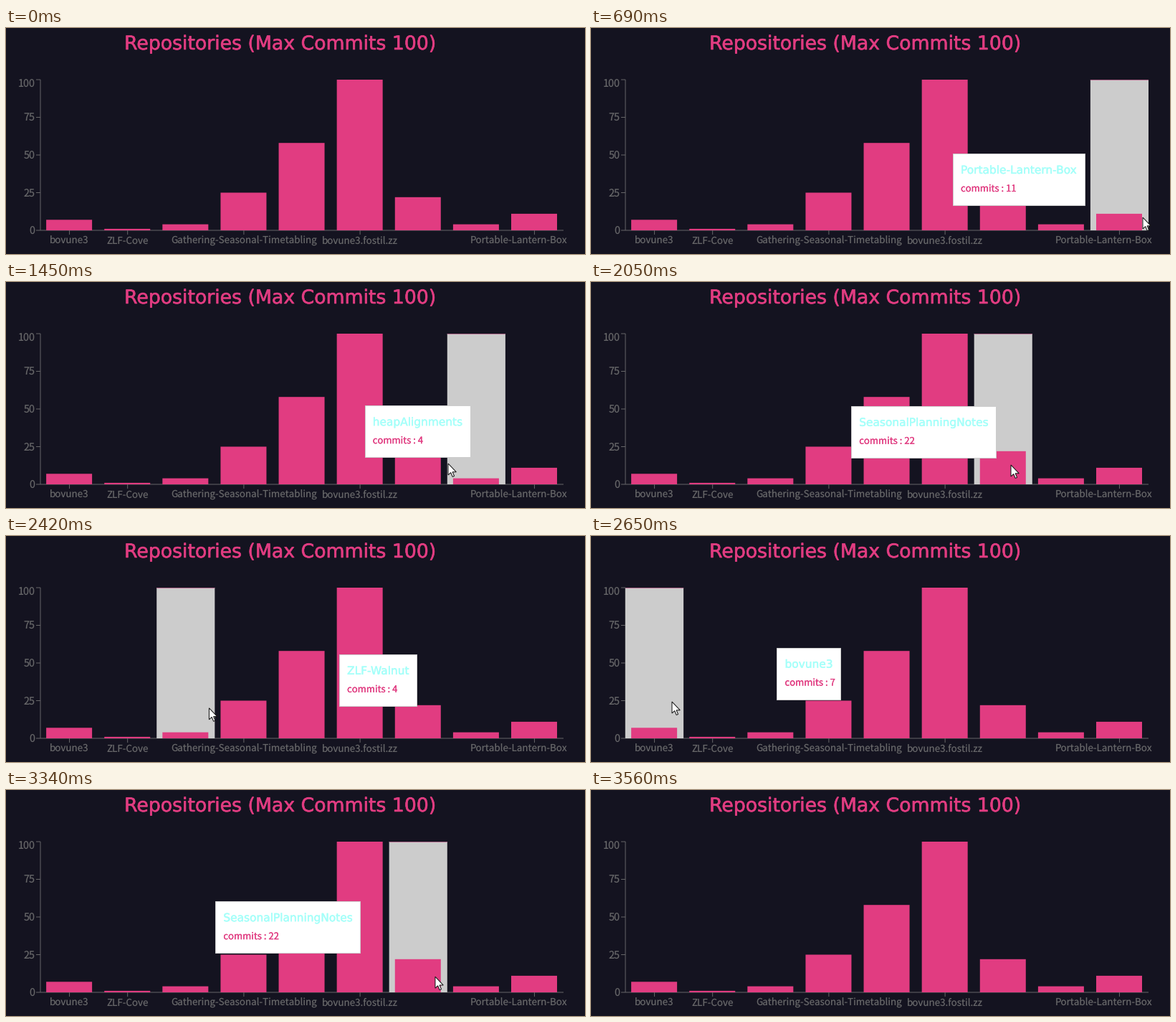
These frames come from a looping animation (808x315 px, 3.95 s). A matplotlib script:

```python
import matplotlib.pyplot as plt
import numpy as np
from matplotlib.animation import FuncAnimation
from matplotlib.patches import Polygon, Rectangle
from matplotlib.patheffects import withStroke

W, H, DPI = 808, 315, 100
LOOP, TICK = 3950, 10
PT = 72 / DPI
BG, PINK, GREY, BAND, AQUA = "#141320", "#e13c81", "#666668", "#cccccc", "#a5fffa"
LEFT, RIGHT, TOP, BASE = 48, 778, 72, 282
SANS, HEADING = ["Noto Sans CJK JP", "Liberation Sans"], "DejaVu Sans"

REPOS = {
    "bovune3": 7,
    "ZLF-Cove": 1,
    "ZLF-Walnut": 4,
    "Gathering-Seasonal-Timetabling": 25,
    "marsh-notebook": 58,
    "bovune3.fostil.zz": 100,
    "SeasonalPlanningNotes": 22,
    "heapAlignments": 4,
    "Portable-Lantern-Box": 11,
}
NAMES = list(REPOS)
STEP = (RIGHT - LEFT) / len(NAMES)

# The screen refreshes in even steps while the pointer is present.
STEPS = (380 + np.arange(43) * 3180 // 42) // 10 * 10

# Pointer path: time, x, y
POINTER = np.array([
    (380, 803, 303), (680, 770, 264), (1130, 695, 257), (1440, 617, 253),
    (2040, 586, 255), (2110, 530, 252), (2270, 468, 247), (2500, 185, 236),
    (2650, 113, 231), (2880, 90, 232), (3020, 135, 230), (3100, 234, 228),
    (3400, 710, 270), (3560, 750, 310)])
ARROW = np.array([(0, 0), (0, 16), (3.7, 12.6), (6.2, 18.5), (8.6, 17.4),
                  (6.1, 11.8), (11.3, 11.8)])

plt.rcParams["text.hinting"] = "none"
fig = plt.figure(figsize=(W / DPI, H / DPI), dpi=DPI, facecolor=BG)
ax = fig.add_axes([0, 0, 1, 1])
ax.set(xlim=(0, W), ylim=(H, 0))
ax.axis("off")


def label(x, y, s, px, color, ha="left", font=SANS, bold=0, z=5):
    text = ax.text(x, y, s, fontsize=px * PT, color=color, ha=ha,
                   va="baseline", family=font, zorder=z)
    if bold:
        text.set_path_effects([withStroke(linewidth=bold * PT, foreground=color)])
    return text


def line(xs, ys, color=GREY, z=2):
    return ax.plot(xs, ys, color=color, lw=PT, zorder=z, snap=False,
                   solid_capstyle="butt")[0]


def box(x, y, w, h, color, z):
    return ax.add_patch(Rectangle((x, y), w, h, fc=color, ec="none",
                                  zorder=z, snap=False))


def ease(u):
    """CSS 'ease': cubic-bezier(.25, .1, .25, 1)."""
    s = np.linspace(0, 1, 200)
    a, b, c = 3 * (1 - s) ** 2 * s, 3 * (1 - s) * s ** 2, s ** 3
    return np.interp(u, 0.25 * a + 0.25 * b + c, 0.1 * a + b + c)


# Static chart
label(383, 30, "Repositories (Max Commits 100)", 26.7, PINK, "center", HEADING, 0.6)
line([LEFT, LEFT], [TOP, BASE])
line([LEFT, RIGHT], [BASE, BASE])
for value in range(0, 101, 25):
    y = BASE - (BASE - TOP) * value / 100
    line([LEFT - 6, LEFT], [y, y])
    label(40.5, max(y, 77) + 5, str(value), 14.4, GREY, "right")

for i, (name, commits) in enumerate(REPOS.items()):
    h = (BASE - TOP) * commits / 100
    box(LEFT + STEP * (i + 0.1), BASE - h, 64, h, PINK, 4)
    if i in (0, 1, 3, 5, 8):
        mid = LEFT + STEP * (i + 0.5)
        line([mid, mid], [BASE, BASE + 6])
        last = i == len(NAMES) - 1
        label(783 if last else mid, 300.5, name, 13.4, GREY,
              "right" if last else "center")

# Hover parts
band = box(LEFT, TOP, STEP, BASE - TOP, BAND, 3)
rim = line([0, 0], [TOP + 0.5] * 2, "#b06a8c", 3.5)
tip = ax.add_patch(Rectangle((0, 0), 1, 72, fc="white", ec=BAND, lw=PT, zorder=6))
tip_name = label(0, 0, "", 15.4, AQUA, font=HEADING, bold=0.4, z=7)
tip_count = label(0, 0, "", 13.1, PINK, bold=0.2, z=7)
hover_parts = (band, rim, tip, tip_name, tip_count)
arrow = ax.add_patch(Polygon(ARROW, fc="white", ec="#111111", lw=PT, zorder=9))


def tip_width(name):
    tip_name.set_text(name)
    return round(tip_name.get_window_extent().width) + 22


WIDTHS = [tip_width(name) for name in NAMES]


def tip_goal(n, y):
    """Right of the bar's centre, or left of it where the chart ends."""
    mid = LEFT + STEP * (n + 0.5)
    x = mid + 10
    if x + WIDTHS[n] > RIGHT:
        x = mid - 10 - WIDTHS[n]
    return np.array([x, y - 82])


def track():
    """Pointer, hovered bar and tooltip position at each step."""
    start = goal = pos = np.array([505, 175])
    bar, since, poses = None, 0, []
    for t in STEPS[:-1]:
        x, y = (np.interp(t, POINTER[:, 0], POINTER[:, i]) for i in (1, 2))
        n = None
        if LEFT <= x < RIGHT and TOP <= y <= BASE:
            n = int((x - LEFT) / STEP)
            pos = start + (goal - start) * ease((t - since) / 400)
            if n != bar:
                start, since, bar = pos, t, n
            goal = tip_goal(n, y)
        poses.append((np.array([x, y]), n, pos))
    return poses


POSES = track()


def update(i):
    k = np.searchsorted(STEPS, i * TICK, side="right") - 1
    present = 0 <= k < len(POSES)
    point, n, pos = POSES[k] if present else (None, None, None)
    arrow.set_visible(present)
    if present:
        arrow.set_xy(ARROW + point)
    for part in hover_parts:
        part.set_visible(n is not None)
    if n is not None:
        left = LEFT + STEP * n
        band.set_x(left)
        rim.set_xdata([left, left + STEP])
        tip.set_bounds(*pos, WIDTHS[n], 72)
        tip_name.set_text(NAMES[n])
        tip_name.set_position(pos + (11, 28))
        tip_count.set_text(f"commits : {REPOS[NAMES[n]]}")
        tip_count.set_position(pos + (11, 53))
    return (*hover_parts, arrow)


anim = FuncAnimation(fig, update, frames=LOOP // TICK, interval=TICK,
                     init_func=lambda: update(0), repeat=True, repeat_delay=0)
plt.show()
```
